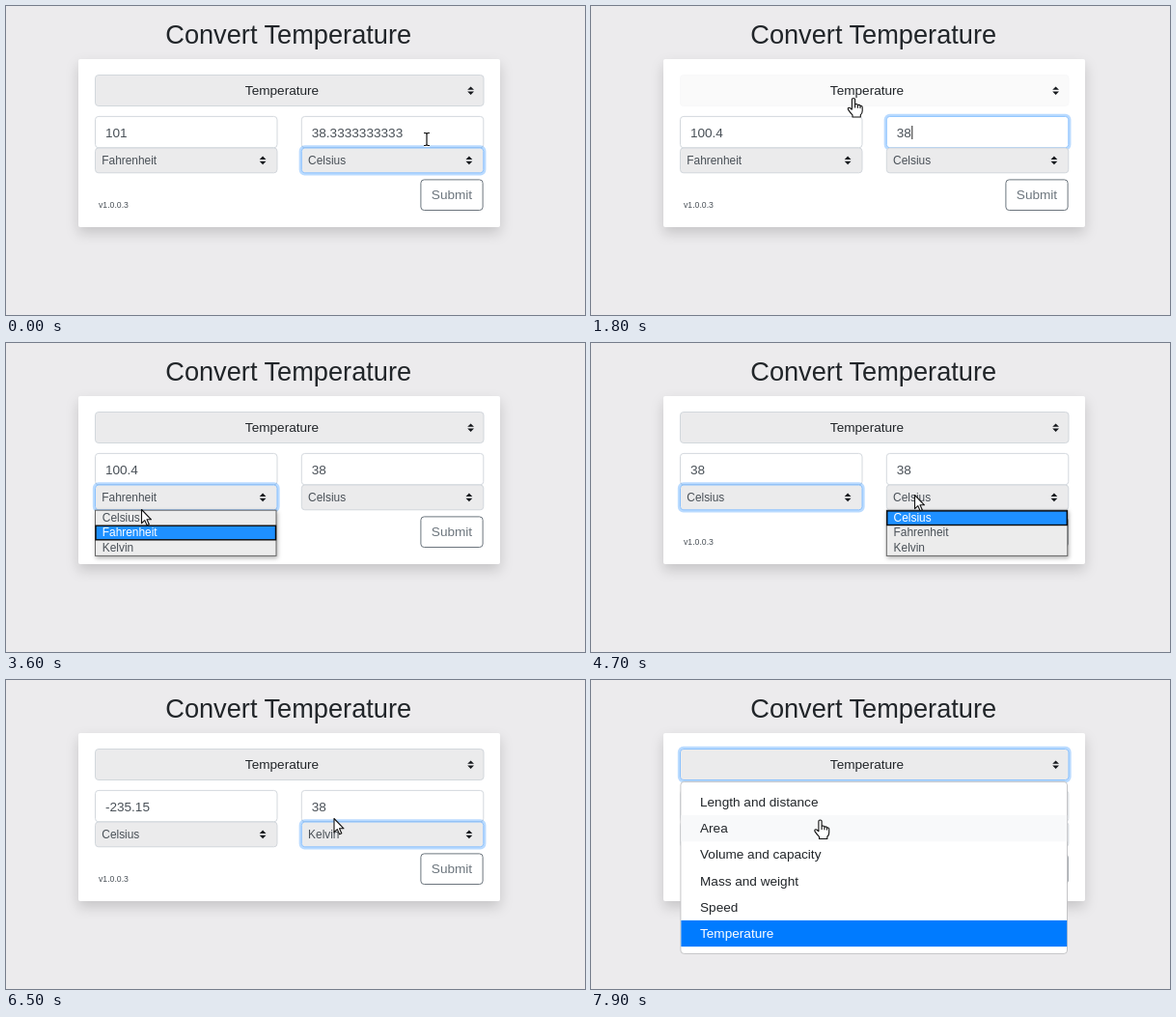
These frames come from a looping animation (600x320 px, 8000 ms). An HTML page:

```html
<!DOCTYPE html>
<html lang="en">
<head>
<meta charset="utf-8">
<title>Convert Temperature</title>
<style>
  html, body { margin: 0; width: 100%; height: 100%; overflow: hidden; background: #ecebed; }
  svg { display: block; font-family: "Liberation Sans", Arial, sans-serif; font-size: 13.6px; fill: #495057; }
  .card { fill: #fff; filter: drop-shadow(0 6.8px 6.5px rgba(0, 0, 0, .16)); }
  .popup { filter: drop-shadow(1px 2px 2px rgba(0, 0, 0, .3)); }
  .dark { fill: #212529; }
  .small { font-size: 11.9px; }
  .mid { text-anchor: middle; }
</style>
</head>
<body>
<svg id="stage" width="600" height="320" viewBox="0 0 600 320"></svg>
<script>
const LOOP = 8000, STEP = 100;
const UNITS = ['Celsius', 'Fahrenheit', 'Kelvin'];
const QUANTITIES = ['Length and distance', 'Area', 'Volume and capacity', 'Mass and weight', 'Speed', 'Temperature'];
const ROW = 15.3, ITEM = 27.2, ITEMS_TOP = 112.9;
const stage = document.getElementById('stage');

function add(parent, tag, attrs, content) {
  const node = document.createElementNS('http://www.w3.org/2000/svg', tag);
  set(node, attrs);
  if (content !== undefined) node.textContent = content;
  parent.append(node);
  return node;
}
function set(node, attrs) {
  for (const key in attrs) node.setAttribute(key, attrs[key]);
}
const group = (parent, attrs = {}) => add(parent, 'g', attrs);
const rect = (parent, x, y, width, height, attrs) => add(parent, 'rect', { x, y, width, height, ...attrs });
const text = (parent, x, y, content, cls = '') => add(parent, 'text', { x, y, class: cls }, content);
const show = (node, on) => set(node, { visibility: on ? 'visible' : 'hidden' });

function box(x, y, w, h, fill) {
  const glow = rect(stage, x - 1.3, y - 1.3, w + 2.6, h + 2.6,
    { rx: 4.5, fill: 'none', stroke: '#007bff', 'stroke-opacity': .27, 'stroke-width': 2.7 });
  const frame = rect(stage, x, y, w, h, { rx: 3.4, fill, stroke: '#ced4da', 'stroke-width': .9 });
  return { glow, frame };
}
function arrows(x, y) {
  add(stage, 'path', { d: `M${x - 3.4} ${y - .9}l3.4-3.4 3.4 3.4zm0 1.8h6.8l-3.4 3.4z`, fill: '#16191d' });
}
function focus(control, on) {
  show(control.glow, on);
  set(control.frame, { stroke: on ? '#80bdff' : '#ced4da' });
}

// Static page
rect(stage, 0, 0, 600, 320, { fill: '#ecebed' });
set(text(stage, 292.7, 38.5, 'Convert Temperature', 'mid dark'), { 'font-size': 27.2 });
rect(stage, 75, 55, 437, 174, { class: 'card', rx: 2 });
set(text(stage, 96, 208.6, 'v1.0.0.3'), { 'font-size': 8.7 });
rect(stage, 429.9, 179.9, 64.2, 31.6, { rx: 3.4, fill: '#fff', stroke: '#6c757d' });
set(text(stage, 462, 200.3, 'Submit', 'mid'), { fill: '#6c757d' });

// Controls
const category = box(92.5, 71.5, 402.5, 32, '#ebebec');
text(stage, 286, 92.2, 'Temperature', 'mid dark');
arrows(481.6, 87.7);

function makeSide(x) {
  const input = box(x, 114.4, 188.5, 32.4, '#fff');
  const mark = rect(stage, x, 123, 0, 16, { fill: '#0078d7' });
  const value = text(stage, x + 10.4, 135.6, '');
  const select = box(x, 147, 188.5, 25.8, '#ebebec');
  const unit = text(stage, x + 6.8, 163.7, '', 'small');
  arrows(x + 173.6, 159.9);
  return { x, input, mark, value, select, unit };
}
const left = makeSide(92.5), right = makeSide(306.3);
const caret = rect(stage, 332.3, 124, 1, 14, { fill: '#222' });

function makeList(side) {
  const root = group(stage, { class: 'popup' });
  rect(root, side.x, 173.2, 187.5, 47.2, { fill: '#ececec', stroke: '#666', 'stroke-width': 1 });
  const bar = rect(root, side.x + .5, 0, 186.5, 14.6, { fill: '#1e90ff', stroke: '#0a0a0a', 'stroke-width': 1.4 });
  const labels = UNITS.map((name, i) => text(root, side.x + 7.3, 185.1 + i * ROW, name, 'small'));
  return { root, bar, labels };
}
left.list = makeList(left);
right.list = makeList(right);

const menu = group(stage);
rect(menu, 92.9, 105.4, 400.6, 178, { rx: 3.4, fill: '#fff', stroke: '#bfbfc1', 'stroke-width': .9 });
const hoverItem = rect(menu, 93.4, 0, 399.8, ITEM, { fill: '#f8f9fa' });
rect(menu, 93.4, ITEMS_TOP + 5 * ITEM, 399.8, ITEM, { fill: '#007bff' });
QUANTITIES.forEach((name, i) => {
  const label = text(menu, 113, 131 + i * ITEM, name, 'dark');
  if (i === 5) label.style.fill = '#fff';
});

// Cursors, each with its hot spot at 0,0
const ink = { fill: '#fff', stroke: '#111', 'stroke-width': 1.1, 'stroke-linejoin': 'round' };
const cursors = { arrow: group(stage), hand: group(stage), beam: group(stage) };
add(cursors.arrow, 'path', { d: 'M.5.5v14.2l3.3-3.1 2.3 5.2 2.2-1-2.3-5h4.5z', ...ink });
add(cursors.hand, 'path', {
  d: 'M-1.6 12V1.6Q-1.6 0 0 0T1.6 1.6V6.5Q3.7 5.2 4.4 7.2 6.2 6.2 7 8 9.2 7.4 9.2 9.6V13Q9.2 16 7.3 17.2V19.5H-1V17.4Q-3.4 15-5.6 11.6-6 9.5-4.3 9.7-3 10-1.6 12M1.6 6.5V10M4.4 7.2v3M7 8v2.6', ...ink
});
const beam = 'M-3-6.5h2l1 1 1-1h2M0-5.5V5.5M-3 6.5h2l1-1 1 1h2';
for (const [stroke, width] of [['#fff', 3], ['#111', 1.2]])
  add(cursors.beam, 'path', { d: beam, fill: 'none', stroke, 'stroke-width': width });

// Timelines: [ms, value]
const track = {
  focus: [[0, right.select], [300, right.input], [3300, left.select], [4800, right.select], [7300, category]],
  open: [[0, null], [3300, left], [3900, null], [4700, right], [5700, null]],
  leftValue: [[0, '101'], [800, '37.4'], [1000, '100.4'], [3900, '38'], [5700, '-235.15']],
  rightValue: [[0, '38.3333333333'], [800, '3'], [1000, '38']],
  leftUnit: [[0, 1], [3900, 0]],
  rightUnit: [[0, 0], [5700, 2]],
  menu: [[0, false], [7300, true]],
  caret: [[0, false], [1000, true], [2200, false], [2700, true], [3200, false]]
};
const path = [
  [0, 436, 138], [300, 412, 133], [600, 313, 132], [1200, 313, 134], [1700, 272, 95.5], [2400, 272, 95.5],
  [3000, 140, 160], [3400, 140, 160], [3600, 140, 172], [3800, 141, 181], [4100, 142, 181], [4600, 335, 157],
  [4900, 335, 157], [5300, 339.5, 203], [5500, 341, 213], [5900, 341, 213], [6400, 339.5, 143],
  [6700, 339.5, 143], [7200, 250, 92], [7500, 250, 92], [7800, 237.5, 145]
];

const at = (keys, t) => keys.findLast(key => key[0] <= t)[1];
function pointerAt(t) {
  const i = path.findLastIndex(key => key[0] <= t);
  const [t0, x0, y0] = path[i], [t1, x1, y1] = path[i + 1] || [LOOP, x0, y0];
  const p = (t - t0) / (t1 - t0), e = p * p * (3 - 2 * p);
  return { x: x0 + (x1 - x0) * e, y: y0 + (y1 - y0) * e };
}

function drawList(side, open, chosen, y) {
  show(side.list.root, open);
  const row = Math.floor((y - 173.4) / ROW);
  const active = row >= 0 && row < 3 ? row : chosen;
  set(side.list.bar, { y: 173.9 + active * ROW });
  side.list.labels.forEach((label, i) => set(label, { fill: i === active ? '#fff' : '#495057' }));
}

function render(t) {
  const now = {};
  for (const key in track) now[key] = at(track[key], t);
  const { x, y } = pointerAt(t);
  const onCategory = y > 71 && y < 104;

  for (const control of [category, left.input, left.select, right.input, right.select])
    focus(control, control === now.focus);
  const hovered = onCategory && !now.menu;
  set(category.frame, { fill: hovered ? '#fafafa' : '#ebebec' });
  if (hovered) set(category.frame, { stroke: '#f8f8f9' });

  left.value.textContent = now.leftValue;
  right.value.textContent = now.rightValue;
  left.unit.textContent = UNITS[now.leftUnit];
  right.unit.textContent = UNITS[now.rightUnit];
  drawList(left, now.open === left, now.leftUnit, y);
  drawList(right, now.open === right, now.rightUnit, y);

  const marking = t >= 400 && t < 800, markX = Math.max(x, 316.7);
  set(right.mark, { x: markX, width: marking ? Math.max(0, 411.5 - markX) : 0 });
  set(right.value, { fill: marking && markX < 330 ? '#fff' : '#495057' });
  show(caret, now.caret);

  show(menu, now.menu);
  const item = Math.floor((y - ITEMS_TOP) / ITEM);
  set(hoverItem, { y: ITEMS_TOP + Math.max(0, item) * ITEM, opacity: item >= 0 ? 1 : 0 });

  const shape = onCategory || now.menu ? 'hand' : t < 1700 ? 'beam' : 'arrow';
  for (const name in cursors) show(cursors[name], name === shape);
  set(cursors[shape], { transform: `translate(${x} ${y})` });
}

const start = performance.now();
function tick() {
  const t = (performance.now() - start) % LOOP;
  render(Math.floor(t / STEP) * STEP);
  requestAnimationFrame(tick);
}
tick();
</script>
</body>
</html>
```
